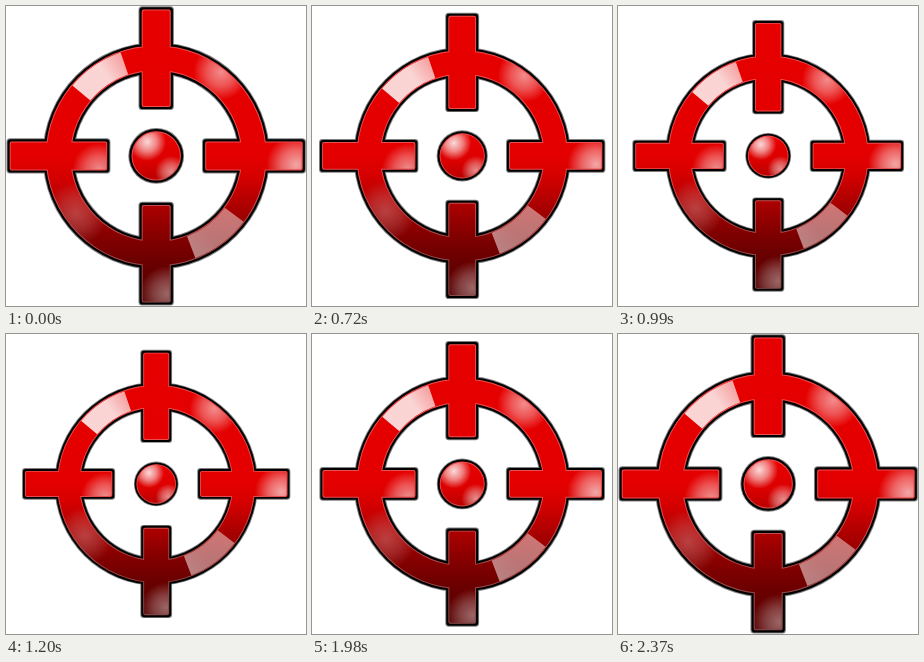
Animation of 300x300 px, one loop 2.4 s. Source, as an HTML page with a canvas:

```html
<!DOCTYPE html>
<html lang="en">
<head>
<meta charset="utf-8">
<title>Crosshair</title>
<style>
  html, body { margin: 0; height: 100%; overflow: hidden; background: #fff; }
  canvas { display: block; width: 100vw; height: 100vh; }
</style>
</head>
<body>
<canvas id="stage"></canvas>
<script>
const canvas = document.getElementById('stage');
const ctx = canvas.getContext('2d');
const TAU = Math.PI * 2, DEG = Math.PI / 180;
const LOOP = 2400, HALF = 1200, HOLD = 600, STEP = 30;
const SHRINK = 0.104, DOT_SHRINK = 0.2;
const OUTER = 110.5, INNER = 85;

// Crosshair silhouette around the origin, grown by d on every side.
function crosshair(d) {
  const p = new Path2D();
  p.arc(0, 0, OUTER + d, 0, TAU);
  p.closePath();
  p.moveTo(INNER - d, 0);
  p.arc(0, 0, INNER - d, 0, TAU, true);
  p.closePath();
  const near = 49 - d, len = 97.5 + 2 * d, half = 14.5 + d, r = 2 + d / 2;
  p.roundRect(near, -half, len, 2 * half, r);
  p.roundRect(-near - len, -half, len, 2 * half, r);
  p.roundRect(-half, near, 2 * half, len, r);
  p.roundRect(-half, -near - len, 2 * half, len, r);
  return p;
}

function dot(d) {
  const p = new Path2D();
  p.arc(0, 0, 24.7 + d, 0, TAU);
  return p;
}

function fill(path, style) {
  ctx.fillStyle = style;
  ctx.fill(path);
}

function vertical(y0, y1, stops) {
  const g = ctx.createLinearGradient(0, y0, 0, y1);
  for (const [y, color] of stops) g.addColorStop((y - y0) / (y1 - y0), color);
  return g;
}

const white = a => `rgba(255,255,255,${a})`;

// Glossy slice of the ring, opacity running from angle a0 to a1.
function wedge(a0, a1, alpha0, alpha1) {
  const s = a0 * DEG, e = a1 * DEG, at = a => [96 * Math.cos(a), 96 * Math.sin(a)];
  const g = ctx.createLinearGradient(...at(s), ...at(e));
  g.addColorStop(0, white(alpha0));
  g.addColorStop(0.6, white(alpha0));
  g.addColorStop(1, white(alpha1));
  const p = new Path2D();
  p.arc(0, 0, OUTER - 1, s, e);
  p.arc(0, 0, INNER + 1, e, s, true);
  p.closePath();
  fill(p, g);
}

function glow(x, y, r, alpha) {
  const g = ctx.createRadialGradient(x, y, 0, x, y, r);
  g.addColorStop(0, white(alpha));
  g.addColorStop(0.5, white(alpha * 0.6));
  g.addColorStop(1, white(0));
  ctx.fillStyle = g;
  ctx.fillRect(x - r, y - r, 2 * r, 2 * r);
}

function bevelled(shape, scale, body, gloss) {
  ctx.save();
  ctx.scale(scale, scale);
  fill(shape(3.2), 'rgba(0,0,0,0.5)');
  fill(shape(2.2), '#000');
  fill(shape(0), body);
  fill(shape(0), white(0.3));
  fill(shape(-1), body);
  ctx.clip(shape(-1));
  gloss();
  ctx.restore();
}

function draw(small) {
  const k = canvas.width / 300;
  ctx.setTransform(k, 0, 0, k, 0, 0);
  ctx.fillStyle = '#fff';
  ctx.fillRect(0, 0, 300, 300);
  ctx.translate(150.2, 149.9);

  const body = vertical(-147, 147, [
    [-147, '#e60000'], [0, '#e40000'], [20, '#d60000'], [55, '#a60000'],
    [85, '#800000'], [110, '#680000'], [147, '#540000']
  ]);
  bevelled(crosshair, 1 - SHRINK * small, body, () => {
    wedge(220, 251, 0.83, 0.65);
    wedge(37, 69, 0.46, 0.5);
    glow(65, -84, 28, 0.55);
    glow(-80, 58, 32, 0.25);
    glow(-57, 14, 27, 0.55);
    glow(140, 9, 30, 0.65);
    glow(11, 138, 28, 0.4);
  });

  const ball = vertical(-25, 25, [[-25, '#e80000'], [5, '#dc0000'], [25, '#b80000']]);
  bevelled(dot, 1 - DOT_SHRINK * small, ball, () => {
    glow(-9, -14, 19, 0.85);
    glow(15, 16, 16, 0.55);
  });
}

// How far shrunk, 0 to 1: hold, then ease out in 20 discrete steps, then back.
function smallAt(ms) {
  const t = ms % LOOP;
  const tick = Math.floor((t % HALF - HOLD) / STEP);
  const rest = tick < 1 ? 1 : (1 - (tick + 1) / 21) ** 2;
  return t < HALF ? 1 - rest : rest;
}

function resize() {
  canvas.width = canvas.height = Math.round(innerWidth * (window.devicePixelRatio || 1));
}

addEventListener('resize', resize);
resize();
const start = performance.now();
function frame() {
  draw(smallAt(performance.now() - start));
  requestAnimationFrame(frame);
}
frame();
</script>
</body>
</html>
```
